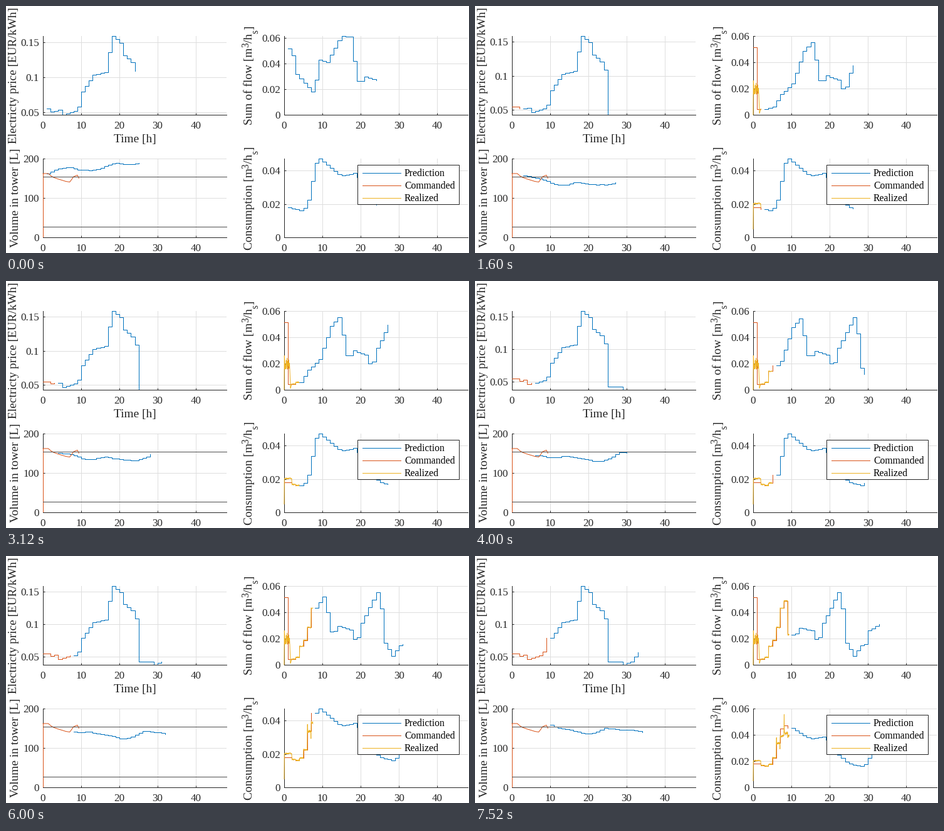
Write a matplotlib script that moves like this. It is 739 px wide and 395 px high and loops after 7.6 s.

```python
import numpy as np
import matplotlib.pyplot as plt
from matplotlib.animation import FuncAnimation
from matplotlib.patches import Rectangle

W, H, DPI = 739, 395, 100
FRAMES, INTERVAL = 95, 80
PX = 72 / DPI  # points per pixel
BLUE, RED, YELLOW = "#0072BD", "#D95319", "#EDB120"
DARK, INK, GRID = "#4d4d4d", "#262626", "#dedede"
LITRES = 160  # litres gained per unit of net hourly flow

plt.rcParams.update({"font.family": "Liberation Serif", "axes.linewidth": PX})

# Key points (hour, value) of the hourly curves
PRICE = [(1, .055), (2, .0505), (4, .053), (5, .0463), (8, .052), (9, .058),
         (10, .079), (13, .103), (16, .107), (17, .1355), (18, .1585),
         (20, .149), (21, .131), (23, .121), (24, .109), (25, .043),
         (28, .043), (29, .038), (31, .043), (33, .0575)]
USE = [(0, .0195), (1, .018), (4, .0161), (5, .0176), (6, .0225), (8, .0447),
       (9, .0473), (12, .0416), (14.5, .037), (18, .0385), (20, .0335), (22, .025)]
FLOW = [(5, .005), (7, .0065), (9, .016), (12, .024), (15, .049), (17, .0553),
        (18, .042), (19, .0262), (20, .0262), (21, .0298), (24, .0267),
        (25, .0198), (26, .0212), (27, .032), (31, .0553), (32, .043),
        (33, .0168), (35, .0066), (37, .015), (38, .0155), (39, .026), (42, .031)]
FIRST_FLOW = [(1, .0515), (2, .0465), (3, .0315), (7, .0183), (8, .0275),
              (9, .043), (11, .041), (14, .058), (15, .0615), (17, .0608), (18, 0)]
TOWER = [(0, 162), (1.4, 162), (2.1, 156), (2.8, 152), (4, 148), (6, 142),
         (7, 140.5), (7.5, 147), (8, 154), (9, 158), (9.4, 150)]
START_FLOW = [(0, 0), (.05, .026), (.2, .019), (1.4, .02), (1.65, .001), (2, .005)]


def curve(points, x, **kw):
    return np.interp(x, *zip(*points), **kw)


def plan(n):
    """Predictions made at step n for the 24 hours from n + 1."""
    hours = np.arange(n + 1, n + 25)
    lag = hours - (n == 1)  # the second step still reads the first forecast
    # The flow pattern slides an hour per step and is damped at its start
    flow = curve(FLOW, lag if n < 2 else hours + n)
    flow *= 1 - .12 * np.exp(-np.arange(24) / 3)
    if n == 0:
        flow = np.maximum(flow, curve(FIRST_FLOW, hours))
    use = curve(USE, lag, period=24)
    volume = curve(TOWER, n) + LITRES * np.cumsum(np.r_[0, flow - use])
    return {"price": curve(PRICE, lag), "flow": flow, "use": use, "volume": volume}


PLANS = [plan(n) for n in range(10)]
FIRST = {key: np.array([p[key][0] for p in PLANS]) for key in ("price", "flow", "use")}

# Measured curves follow the commanded values with noise
rng = np.random.default_rng(4)
T = np.arange(189) * .05
hour = np.maximum(T - .05, 0).astype(int)
noise = rng.normal(size=(2, T.size))


def spike(at, height):
    return height * np.exp(-((T - at) / .04) ** 2)


REAL = {
    "flow": np.where(T < 2, curve(START_FLOW, T), FIRST["flow"][hour])
    + noise[0] * np.where((T > .1) & (T < 1.4), .002, .0002),
    "use": FIRST["use"][hour] * np.where(T < 2, 1.13, np.where(T < 7, 1, .87))
    + noise[1] * np.where(T < 6, .0002, .0005) + spike(6.1, .005) + spike(8.1, .014),
}
REAL["flow"][0], REAL["use"][0] = 0, .005

fig = plt.figure(figsize=(W / DPI, H / DPI), dpi=DPI, facecolor="white")


def panel(x, y, yticks):
    w, h = 293, 126
    ax = fig.add_axes([x / W, 1 - (y + h) / H, w / W, h / H])
    ax.set_xticks(range(0, 50, 10))
    ax.set_yticks(yticks, [f"{v:g}" for v in yticks])
    ax.set_xlim(0, 48)
    ax.spines[["top", "right"]].set_visible(False)
    ax.spines[["left", "bottom"]].set_color(INK)
    ax.spines["bottom"].set_zorder(4)
    ax.tick_params(direction="in", length=3 * PX, width=PX, color=INK,
                   labelcolor=INK, labelsize=17 * PX)
    ax.tick_params(axis="x", pad=10 * PX)
    ax.tick_params(axis="y", pad=6 * PX)
    ax.grid(True, color=GRID, linewidth=PX)
    ax.set_axisbelow(True)
    return ax


RATES = [0, .02, .04, .06]
AXES = {
    "price": panel(59, 48, [.05, .1, .15]),
    "flow": panel(444, 48, RATES),
    "volume": panel(59, 244, [0, 100, 200]),
    "use": panel(444, 244, RATES),
}


def line(ax, color, x=(), y=(), **kw):
    return ax.plot(x, y, color=color, lw=PX, zorder=3, clip_on=False, **kw)[0]


planned = {k: line(ax, BLUE, drawstyle="steps-post") for k, ax in AXES.items()}
commanded = {k: line(AXES[k], RED, drawstyle="steps-post") for k in FIRST}
realized = {k: line(AXES[k], YELLOW) for k in REAL}

tower = AXES["volume"]
line(tower, RED, [0, 0], [0, 162])
line(tower, RED, *zip(*TOWER))
for level in (154, 27.5):
    line(tower, DARK, [0, 48], [level, level])
tower.set_ylim(0, 200)

# Labels and legend in pixel coordinates
top = fig.add_axes([0, 0, 1, 1], zorder=5)
top.set(xlim=(0, W), ylim=(H, 0))
top.axis("off")
SIZE = 19.4 * PX
TEXT = dict(color=INK, va="baseline", rotation_mode="anchor")


def rate_label(x, y, name):
    """Upright label with the unit m3/hs, each part set after the last."""
    pos, coords = y, "data"
    for text, scale, drop in ((f"{name} [m", 1, 0), ("3", .8, -6), ("/h", 1, 0),
                              ("s", .8, 9), ("]", 1, 0)):
        part = top.annotate(text, (x + drop, pos), xycoords=coords, ha="left",
                            rotation=90, size=SIZE * scale, **TEXT)
        pos, coords = 1, ("data", part)


top.text(17, 110.5, "Electricty price [EUR/kWh]", size=SIZE, ha="center",
         rotation=90, **TEXT)
top.text(20, 306.5, "Volume in tower [L]", size=SIZE, ha="center",
         rotation=90, **TEXT)
top.text(205.5, 218, "Time [h]", size=SIZE, ha="center", **TEXT)
rate_label(393, 190, "Sum of flow")
rate_label(393, 390.5, "Consumption")

top.add_patch(Rectangle((561, 254), 162, 63, fc="white", ec=INK, lw=PX))
for i, (name, color) in enumerate([("Prediction", BLUE), ("Commanded", RED),
                                   ("Realized", YELLOW)]):
    y = 267 + 20 * i
    line(top, color, [569, 630], [y, y])
    top.text(636, y + 4.5, name, size=15.8 * PX, color="black", va="baseline")


def update(k):
    n, m = k // 10, 2 * k + 1 if k else 0
    now = PLANS[n]
    for key, ln in planned.items():
        ln.set_data(n + 1 + np.arange(len(now[key])), now[key])
    for key, ln in commanded.items():
        ln.set_data(np.arange(n + 1), FIRST[key][:n + 1])
    for key, ln in realized.items():
        ln.set_data(T[:m], REAL[key][:m])
    AXES["price"].set_ylim(now["price"].min(), max(v for _, v in PRICE))
    AXES["flow"].set_ylim(0, max(.06, now["flow"].max()))
    peak = max(v for _, v in USE)
    AXES["use"].set_ylim(0, .06 if REAL["use"][:m].max(initial=0) > peak else peak)
    return []


anim = FuncAnimation(fig, update, frames=FRAMES, interval=INTERVAL,
                     repeat=True, repeat_delay=0, blit=False)
plt.show()
```
